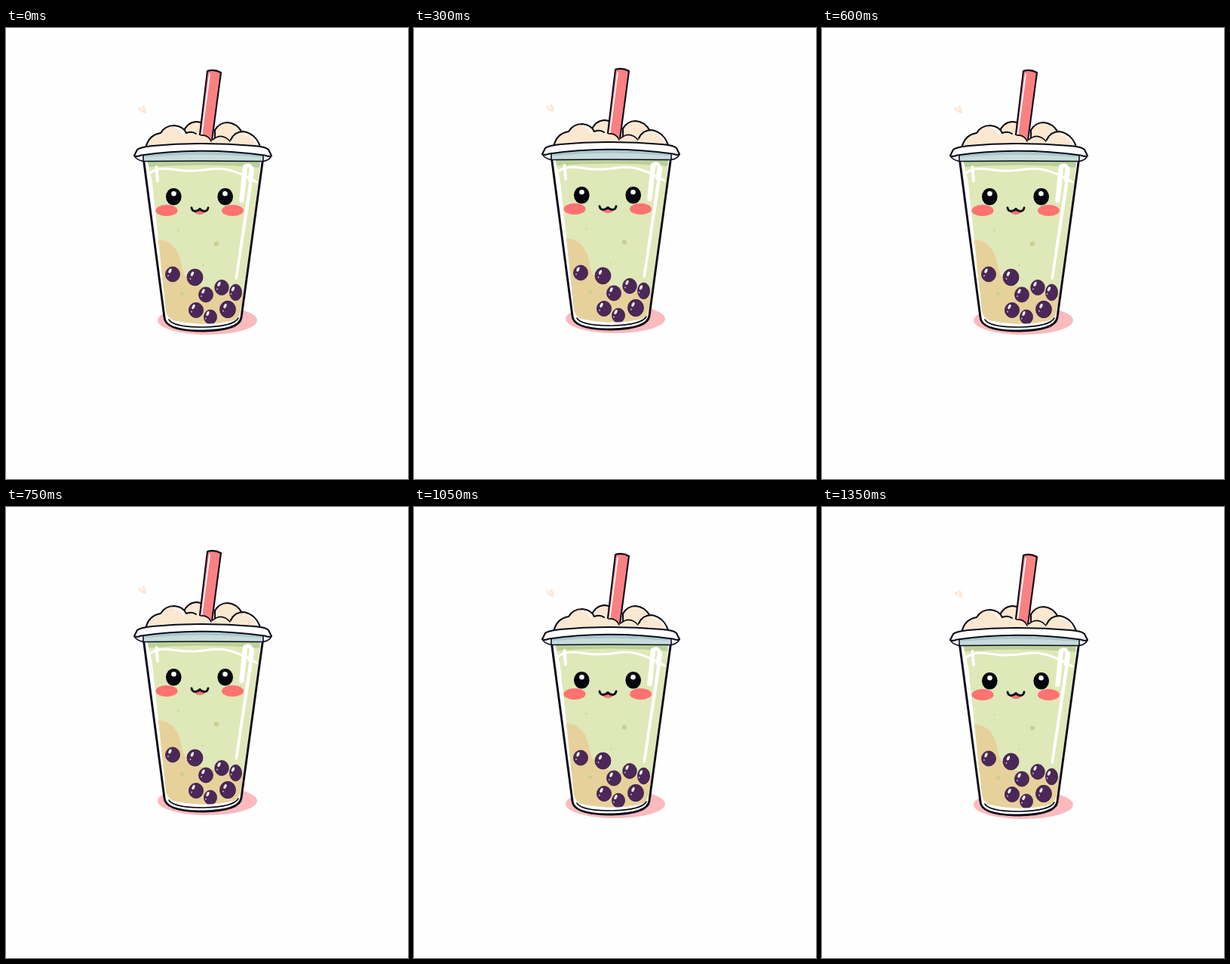
An HTML page that plays this animation: 533x597 px, repeating every 1450 ms.

```html
<!DOCTYPE html>
<html lang="en">
<head>
<meta charset="utf-8">
<title>Bubble tea</title>
<style>
html, body { margin: 0; width: 100%; height: 100%; overflow: hidden; background: #fefefe; }
svg { display: block; width: 533px; height: 597px; }
.ink { stroke: #0b0b1a; stroke-width: 2.1; stroke-linecap: round; stroke-linejoin: round; }
.bold { stroke-width: 2.9; }
.thin { stroke-width: 1.6; }
.line { fill: none; }
.shine { fill: none; stroke: #fff; stroke-linecap: round; stroke-linejoin: round; }
</style>
</head>
<body>
<svg viewBox="0 0 533 597">
<defs>
  <clipPath id="liquid"><path d="M187 174H337L335 205L312 370Q310 384 302 387Q262 396 222 387Q213 383 212 374L194 205Z"/></clipPath>
</defs>
<g id="drink">
  <path d="M175 106Q177 103 180 107Q180 102 183 103Q186 106 186 113Q178 113 175 106Z" fill="#fce8da"/>
  <path d="M179 106L182 107L181 110Z" fill="#fefefe"/>
  <ellipse cx="267" cy="387" rx="66" ry="19" fill="#fbbabd"/>

  <!-- foam and straw -->
  <g class="ink" fill="#fce8d0">
    <path d="M235 138Q240 125 252 124Q260 124 264 130V150H240Z"/>
    <path d="M277 135Q283 125 294 125Q306 126 313 138L300 154H277Z"/>
    <path d="M267 57Q276 54 285 59L273 149H256Z" fill="#f98183"/>
  </g>
  <path class="shine" d="M270 61L259.500 141" stroke-width="1.800"/>
  <path d="M185 160Q188 142 205 139Q211 129 223 129Q235 130 239 139Q248 135 255 142Q267 140 273 149Q285 137 298 148Q303 137 315 137Q332 140 338 160Z" fill="#fce8d0"/>
  <path class="ink line" d="M185 160Q188 142 205 139Q211 129 223 129Q235 130 239 139Q247 136 252 140M298 148Q303 137 315 137Q332 140 338 160"/>
  <path class="ink line thin" d="M258 142Q268 141 272 150M274 148Q286 138 297 150"/>
  <path class="shine" d="M224 132Q232 133 235 140M316 140Q329 143 333 153" stroke-width="2"/>

  <!-- cup -->
  <path d="M182 168L210 383Q211 401 261 401Q310 400 312 383L341 168Z" fill="#fff"/>
  <g clip-path="url(#liquid)">
    <rect x="180" y="170" width="160" height="230" fill="#dfe8b8"/>
    <path d="M180 170H340V185Q261 178 180 185Z" fill="#b9d199"/>
    <path d="M196 280C222 279 230 297 233 315C237 340 256 345 315 350V400H196Z" fill="#e7d19b"/>
    <g fill="#c8d093">
      <circle cx="279" cy="285.500" r="3.100"/>
      <circle cx="228.500" cy="268" r="1"/>
      <circle cx="261" cy="314" r="1"/>
      <circle cx="233.500" cy="351.500" r="2.500"/>
    </g>
    <g id="pearls"></g>
  </g>
  <g class="shine">
    <path d="M191 192C207 181 222 189 242 189C262 190 274 184 291 187C306 190 316 195 332 204" stroke-width="3"/>
    <path d="M199.500 184L201 202" stroke-width="4"/>
    <path d="M317 184L312.500 228" stroke-width="6.500"/>
    <path d="M317 183Q325 179 325 188L323 201" stroke-width="5"/>
  </g>
  <path d="M325 185Q329 181 329 190L307 331Q305 335 303.500 331Z" fill="#fff"/>
  <path class="ink line bold" d="M182 171L210 383Q211 401 261 401Q310 400 312 383L341 171"/>
  <path class="ink line thin" d="M216 386Q222 396 262 396Q302 395 308 384"/>

  <!-- lid -->
  <path class="ink thin" d="M170 169Q173 175 182 176.500Q261 175.500 341 176.500Q350 175 352 169Q261 155 170 169Z" fill="#c7dcdb"/>
  <path d="M184 168Q261 160 339 168V171Q261 164 184 171Z" fill="#a9c7cb"/>
  <path d="M172 170L182 168V174Q174 174 172 170ZM350 170L340 168V174Q348 174 350 170Z" fill="#fff"/>
  <path class="ink" d="M170 169L174 161Q177 158 194 156Q261 150 329 156Q344 157 348 161L352 169Q349 171 343 168.500Q261 157 179 168.500Q173 171 170 169Z" fill="#fff"/>
  <path class="ink line thin" d="M182 169V176M341 169V176"/>

  <!-- face -->
  <g fill="#ff7272">
    <ellipse cx="213" cy="241.500" rx="14.500" ry="7.500"/>
    <ellipse cx="300.500" cy="241.500" rx="14.500" ry="7.500"/>
    <path d="M249 243Q257 239 265 243Q262 247 257 247Q252 247 249 243Z"/>
  </g>
  <g fill="#05050c">
    <ellipse cx="222.300" cy="223.300" rx="10.300" ry="11.300"/>
    <ellipse cx="290.700" cy="223.300" rx="10.300" ry="11.300"/>
  </g>
  <g fill="#fff">
    <circle cx="222.500" cy="219.300" r="3.300"/>
    <circle cx="290.500" cy="219.300" r="3.300"/>
  </g>
  <path class="ink line bold" d="M246 238Q247 242.500 251 242.500Q255 242 257 239.500Q259 242 263 242.500Q267 242.500 268 238"/>
</g>
</svg>
<script>
const pearls = [
  [221, 326, 9.5, 10], [250.5, 330, 10.5, 11], [265, 353, 9.5, 10], [286, 343.5, 9.3, 10],
  [304.5, 350, 8, 10.8], [252, 373.5, 9.6, 10], [271, 382.5, 8.5, 9.5], [294, 372.5, 10.5, 11.2]
];
document.getElementById('pearls').innerHTML = pearls.map(([x, y, rx, ry]) => `
  <g transform="translate(${x} ${y})">
    <ellipse rx="${rx}" ry="${ry}" fill="#4b2858" stroke="#351b43" stroke-width=".8"/>
    <ellipse cx="-3.5" cy="-4.5" rx="1.7" ry="3.2" transform="rotate(25 -3.5 -4.5)" fill="#fff"/>
    <circle cx="-6" cy="2" r=".9" fill="#d9c4df"/>
  </g>`).join('');

// Vertical offset of the drink, held for one step each
const bob = [0, -1.5, -2, -1.5, 0, 2, 4, 6, 7, 7];
const drink = document.getElementById('drink');
const start = performance.now();

function draw() {
  const t = Math.max(0, performance.now() - start) % 1450;
  drink.setAttribute('transform', `translate(0 ${bob[Math.floor(t / 150)]})`);
  requestAnimationFrame(draw);
}
draw();
</script>
</body>
</html>
```
